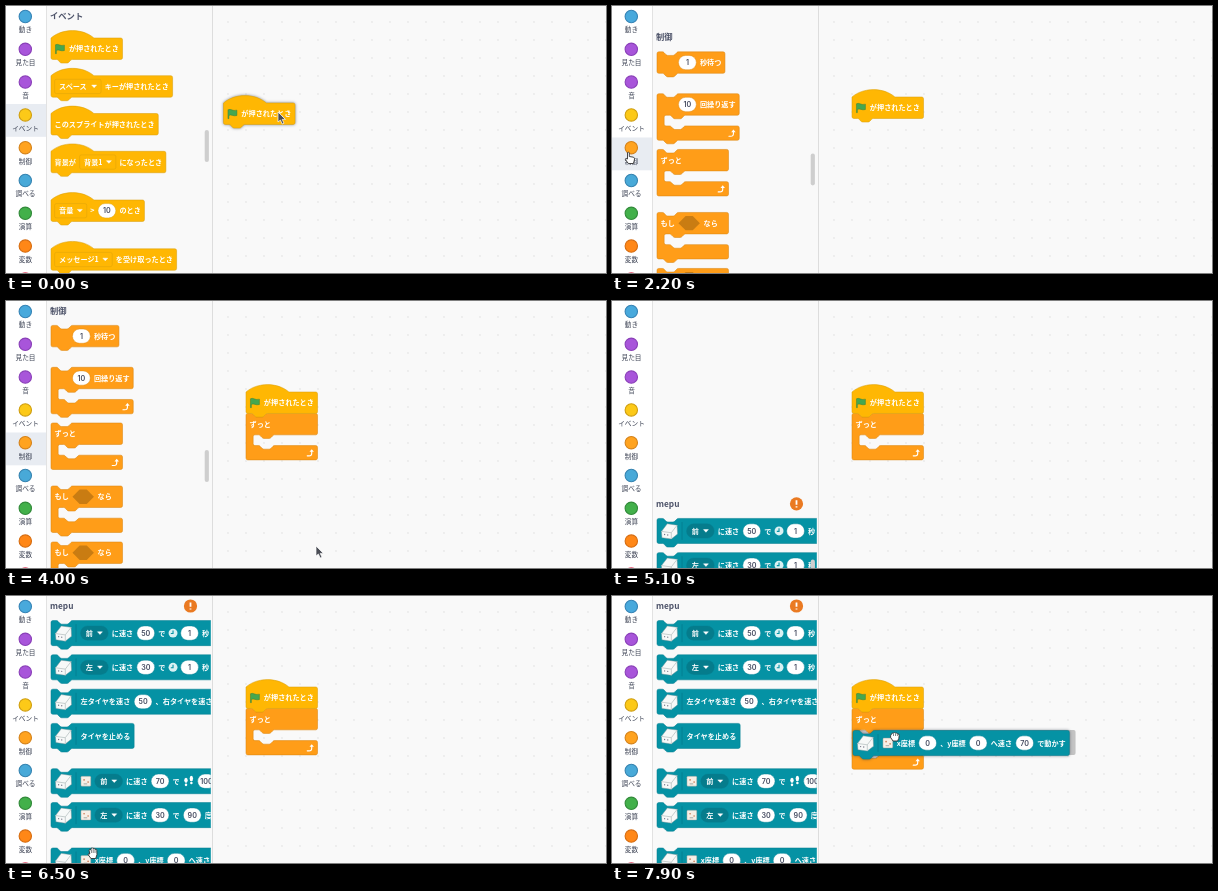
Recreate the animation shown at these times as an HTML page. Size 600 by 267 pixels, loop 8 s.

```html
<!DOCTYPE html>
<html lang="ja">
<head>
<meta charset="utf-8">
<style>
html, body { margin: 0; width: 100%; height: 100%; overflow: hidden; background: #f9f9f9; }
svg { display: block; width: 100%; height: 100%; }
text { font-family: "Noto Sans CJK JP", "Noto Sans CJK", "Noto Sans", sans-serif; }
.b text { font-size: 16px; font-weight: 700; fill: #fff; }
.b .num { font-family: Inter, "Liberation Sans", sans-serif; font-weight: 600; fill: #454b60; text-anchor: middle; }
.head { font-size: 8.3px; font-weight: 700; fill: #4c5268; }
.cat { font-size: 6.7px; font-weight: 500; fill: #3a4052; text-anchor: middle; }
.lift { filter: drop-shadow(0 0 1.6px rgba(20, 30, 50, .5)); }
</style>
</head>
<body>
<svg id="stage" viewBox="0 0 600 267"></svg>
<script>
const LOOP = 8000, STEP = 100, S = 0.447;
const CONTROL_Y = 345, ROBOT_Y = 2050;
const EVENT = { fill: '#ffb703', edge: '#d9a00c', field: '#ffb703' };
const CONTROL = { fill: '#ff9d18', edge: '#d9860f', field: '#c97c12' };
const ROBOT = { fill: '#0592a4', edge: '#057f90', field: '#057c8c' };

const at = (x, y, body, attrs = '') => `<g transform="translate(${x} ${y})" ${attrs}>${body}</g>`;
const rect = (x, y, w, h, fill, attrs = '') =>
  `<rect x="${x}" y="${y}" width="${w}" height="${h}" fill="${fill}" ${attrs}/>`;
const path = (d, attrs) => `<path d="${d}" ${attrs}/>`;
const circle = (x, y, r, attrs) => `<circle cx="${x}" cy="${y}" r="${r}" ${attrs}/>`;
const text = (x, y, s, cls = '') => `<text x="${x}" y="${y}" class="${cls}">${s}</text>`;
const textWidth = s => [...s].reduce((w, c) => w + (c < '\u0080' ? 9 : 16), 0);

// Icons are drawn around their own centre, in block units.
const icons = {
  flag: [24, path('M-9 -9C-4 -12 0 -5 10 -8V4C2 7 -3 0 -8 4V11H-10V-9Z',
    'fill="#45a74f" stroke="#2f7d3c" stroke-linejoin="round"')],
  clock: [18, circle(0, 0, 10, 'fill="#d9f1f3"') +
    path('M0 -6V1H-5', 'fill="none" stroke="#0592a4" stroke-width="2.5"')],
  steps: [24, ['-6 1', '6 -3'].map(p => `<g transform="translate(${p})" fill="#fff">` +
    '<ellipse cy="-3" rx="3.8" ry="6"/><ellipse cy="7" rx="2.8" ry="3"/></g>').join('')],
  mat: [24, rect(-11, -11, 22, 22, '#f7efe6', 'rx="2" stroke="#8f9a97"') +
    circle(-4, -3, 1.8, 'fill="#c9774f"') + circle(5, 2, 1.8, 'fill="#c9774f"') +
    path('M-5 6H3', 'stroke="#9aa3a0" stroke-width="2"')],
  cube: [40, path('M-18 1L-5 -16L17 -13L18 7L4 18L-17 15Z',
    'fill="#f7f9f8" stroke="#6f8f93" stroke-linejoin="round"') +
    path('M-18 1L4 4L17 -13M4 4V18', 'fill="none" stroke="#b9c4c4" stroke-width="1.8"') +
    circle(-11, 8, 1.5, 'fill="#778"') + circle(-4, 9, 1.5, 'fill="#778"')]
};

// Parts: "(" number, "[" square menu, "{" round menu, "<" boolean slot, "@" icon, "|" divider.
function part(p, x, cy, col) {
  const s = p.slice(1);
  switch (p[0]) {
    case '(': return [40, rect(x, cy - 16, 40, 32, '#fff', `rx="16" stroke="${col.edge}"`) +
      text(x + 20, cy + 5.8, s, 'num')];
    case '[': case '{': {
      const round = p[0] === '{', w = textWidth(s) + (round ? 46 : 40);
      const ax = x + w - (round ? 24 : 21);
      return [w, rect(x, cy - 16, w, 32, col.field, `rx="${round ? 16 : 4}" stroke="${col.edge}"`) +
        text(x + (round ? 12 : 10), cy + 6, s) +
        path(`M${ax} ${cy - 3}h11l-5.5 6z`, 'fill="#fff" stroke="#fff" stroke-linejoin="round"')];
    }
    case '<': return [48, path(`M${x} ${cy}l16 -16h16l16 16l-16 16h-16z`, `fill="${col.field}"`)];
    case '@': return [icons[s][0], at(x + icons[s][0] / 2, cy, icons[s][1])];
    case '|': return [2, path(`M${x} ${cy - 20}v40`, `stroke="${col.edge}" stroke-width="2"`)];
    default: return [textWidth(p), text(x, cy + 6, p)];
  }
}

const NOTCH = 'c2 0 3 1 4 2l4 4c1 1 2 2 4 2h12c2 0 3 -1 4 -2l4 -4c1 -1 2 -2 4 -2';
const NOTCH_BACK = 'c-2 0 -3 1 -4 2l-4 4c-1 1 -2 2 -4 2h-12c-2 0 -3 -1 -4 -2l-4 -4c-1 -1 -2 -2 -4 -2';

function outline(shape, w, h, gap, cap) {
  const top = shape === 'hat' ? 'M0 0c25 -22 71 -22 96 0' : `M0 4a4 4 0 0 1 4 -4H12${NOTCH}`;
  const side = v => `H${w - 4}a4 4 0 0 1 4 4v${v - 8}a4 4 0 0 1 -4 4`;
  const mouth = shape === 'c'
    ? `H64${NOTCH_BACK}H20a4 4 0 0 0 -4 4v${gap - 8}a4 4 0 0 0 4 4H28${NOTCH}${side(32)}` : '';
  const foot = cap ? '' : `H48${NOTCH_BACK}`;
  return `${top}${side(h)}${mouth}${foot}H4a4 4 0 0 1 -4 -4z`;
}

function block(col, shape, parts, { gap = 24, loop = false, cap = false, ghost = false } = {}) {
  const h = col === ROBOT ? 56 : 48;
  let x = 8, body = '';
  for (const p of parts) {
    if (shape !== 'hat' && p[0] === '(') x = Math.max(x, 48);
    const [w, svg] = part(p, x, h / 2, col);
    body += svg;
    x += w + 8;
  }
  const w = Math.max(x, shape === 'cmd' ? 64 : 160);
  const shapePath = outline(shape, w, h, gap, cap);
  if (ghost) return `<g transform="scale(${S})">${path(shapePath, 'opacity=".22"')}</g>`;
  if (loop) body += at(w - 16, h + gap + 16,
    path('M-7 7H-3Q3 7 3 1V-3', 'fill="none" stroke="#fff" stroke-width="2.6" stroke-linecap="round"') +
    path('M-2 -2L3 -8L8 -2Z', 'fill="#fff"'));
  return `<g class="b" transform="scale(${S})">` +
    path(shapePath, `fill="${col.fill}" stroke="${col.edge}" stroke-width="1.2"`) + body + '</g>';
}

const stack = (col, shape, rows) =>
  rows.map(([y, parts, opts]) => at(45, y, block(col, shape, parts, opts))).join('');
const robotParts = parts => ['@cube', '|', ...parts];
const HAT = ['@flag', 'が押されたとき'];
const forever = gap => block(CONTROL, 'c', ['ずっと'], { loop: true, cap: true, gap });
const MOVE_TO = robotParts(['@mat', 'x座標', '(0', '、y座標', '(0', 'へ速さ', '(70', 'で動かす']);

const eventList = text(44, 13, 'イベント', 'head') + stack(EVENT, 'hat', [
  [32, HAT],
  [69.7, ['[スペース', 'キーが押されたとき']],
  [107.5, ['このスプライトが押されたとき']],
  [145.3, ['背景が', '[背景1', 'になったとき']],
  [194, ['[音量', '>', '(10', 'のとき']],
  [242.8, ['[メッセージ1', 'を受け取ったとき']]
]);
const controlList = text(44, 13, '制御', 'head') +
  stack(CONTROL, 'cmd', [[24.4, ['(1', '秒待つ']]]) +
  stack(CONTROL, 'c', [
    [66.3, ['(10', '回繰り返す'], { loop: true }],
    [185, ['もし', '<', 'なら']],
    [241, ['もし', '<', 'なら']]
  ]) + at(45, 122, forever());
const robotList = text(44, 13, 'mepu', 'head') +
  circle(184.5, 10, 6.6, 'fill="#ea7a22"') +
  path('M184.5 6.5V10.8M184.5 12.4v1.2', 'stroke="#fff" stroke-width="1.8"') +
  stack(ROBOT, 'cmd', [
    [24.6, ['{前', 'に速さ', '(50', 'で', '@clock', '(1', '秒']],
    [58.8, ['{左', 'に速さ', '(30', 'で', '@clock', '(1', '秒']],
    [93.2, ['左タイヤを速さ', '(50', '、右タイヤを速さ', '(50']],
    [127.4, ['タイヤを止める']],
    [172.7, ['@mat', '{前', 'に速さ', '(70', 'で', '@steps', '(100']],
    [206.6, ['@mat', '{左', 'に速さ', '(30', 'で', '(90', '度']]
  ].map(([y, p]) => [y, robotParts(p)])) + stack(ROBOT, 'cmd', [[252, MOVE_TO]]);

const categories = [
  ['動き', '#48a9dc', '#3583b5'], ['見た目', '#a855da', '#8a40b8'], ['音', '#a855da', '#8a40b8'],
  ['イベント', '#fcc918', '#cf9e10'], ['制御', '#ffa31f', '#d4821a'], ['調べる', '#48a9d8', '#3583b0'],
  ['演算', '#42b04a', '#328a3a'], ['変数', '#ff8717', '#d66c10'], ['', '#ff6680', '#e04a68']
].map(([name, fill, edge], i) => {
  const y = 10.5 + i * 32.8;
  return circle(19.3, y, 6.2, `fill="${fill}" stroke="${edge}" stroke-width="1.1"`) +
    text(19.5, y + 15.8, name, 'cat');
}).join('');

const handStyle = 'fill="#fff" stroke="#333" stroke-width=".9" stroke-linejoin="round"';
const cursors = {
  arrow: path('M0 0V10L2.4 8L4.2 12L6 11.2L4.2 7.4H7.4Z', 'fill="#4a4d55" stroke="#fff" stroke-width=".7"'),
  point: path('M-2.5 -5.5q1.2 -1 1.8 .4V-1.5L3.5 -.8Q5 0 4.4 2L3.4 5.5H-1.6L-4.6 1.6Q-4.6 0 -2.5 1Z', handStyle),
  open: path('M-3.2 1L-4 -3Q-3.2 -4.6 -2.2 -3L-1.8 -4.6Q-.6 -6 0 -4.4Q1.2 -5.8 1.9 -3.6Q3.5 -4.6 3.8 -2.4L4 1.5L2.7 5.5H-2L-4.8 1.8Q-5.2 .2 -3.2 1Z', handStyle) +
    path('M-1.6 -3V0M.2 -4V0M2 -3V0', 'stroke="#333" stroke-width=".6"'),
  closed: path('M-3.6 -1.6Q-3 -3.6 -1.6 -2.8Q-.4 -4 .6 -2.8Q1.8 -3.6 2.5 -2.2Q4.2 -2.4 4.2 -.4L3.8 2.4L2.6 5H-2L-4.4 1.4Q-4.8 -.6 -3.6 -1.6Z', handStyle) +
    path('M-1.5 -2V0M.5 -2V0M2.4 -1.8V0', 'stroke="#333" stroke-width=".6"')
};

const stage = document.getElementById('stage');
stage.innerHTML = `
  <defs>
    <pattern id="dots" x="207" y="0" width="18" height="18" patternUnits="userSpaceOnUse">
      ${circle(15, 16, 0.65, 'fill="#d9d9d9"')}
    </pattern>
    <clipPath id="pane">${rect(41, 0, 163.8, 267, '#000')}</clipPath>
  </defs>
  ${rect(0, 0, 600, 267, '#f9f9f9')}${rect(207, 0, 393, 267, 'url(#dots)')}
  <g id="forever">${forever()}</g>
  <g id="stretched">${forever(56)}</g>
  <g id="hat">${block(EVENT, 'hat', HAT)}</g>
  <g id="ghost">${block(ROBOT, 'cmd', MOVE_TO, { ghost: true })}</g>
  ${rect(0, 0, 40, 267, '#fff')}
  <rect id="mark" width="40" height="32.8" fill="#e8ecf2"/>
  ${categories}
  ${rect(40, 0, 166, 267, '#f9f9f9')}
  <g clip-path="url(#pane)"><g id="list">
    ${eventList}${at(0, CONTROL_Y, controlList)}${at(0, ROBOT_Y, robotList)}
  </g></g>
  <rect id="bar" x="198.7" width="4.2" height="32" rx="2.1" fill="#cecece"/>
  ${rect(40, 0, 0.8, 267, '#dcdcdc')}${rect(206, 0, 0.8, 267, '#d6d6d6')}
  <g id="dragLoop" class="lift">${forever()}</g>
  <g id="dragMove" class="lift">${block(ROBOT, 'cmd', MOVE_TO)}</g>
  ${Object.keys(cursors).map(k => `<g id="${k}">${cursors[k]}</g>`).join('')}`;

const $ = id => document.getElementById(id);
const move = (id, x, y) => $(id).setAttribute('transform', `translate(${x} ${y})`);
const show = (id, on) => { $(id).style.display = on ? '' : 'none'; };

// Pointer stops: time, x, y.
const pointer = [
  [0, 272, 106], [400, 272, 106], [700, 294.5, 100], [1100, 294.5, 100],
  [1600, 18, 152], [2200, 18, 152], [2600, 70, 138], [3000, 70, 138],
  [3400, 275, 133], [3700, 275, 133], [4000, 310, 245], [4400, 310, 245],
  [4600, 60, 290], [6200, 60, 290], [6500, 87, 257], [7400, 87, 257], [7900, 283, 140]
];

function pointerAt(t) {
  const i = pointer.findIndex(k => k[0] > t);
  if (i < 0) return pointer[pointer.length - 1].slice(1);
  const [t0, x0, y0] = pointer[i - 1], [t1, x1, y1] = pointer[i];
  const u = (t - t0) / (t1 - t0), e = u * u * (3 - 2 * u);
  return [x0 + (x1 - x0) * e, y0 + (y1 - y0) * e];
}

function pointerKind(t) {
  if (t < 1500 || (t >= 3800 && t < 4700)) return 'arrow';
  if (t < 2400) return 'point';
  return (t >= 3100 && t < 3500) || t >= 7500 ? 'closed' : 'open';
}

function scrollAt(t) {
  const glide = (from, to, start) => to + (from - to) * Math.exp((start - t) / 46.8);
  if (t < 2100) return 0;
  if (t < 5100) return glide(0, CONTROL_Y, 2070);
  return t < 5400 ? glide(CONTROL_Y, ROBOT_Y, 4998) : ROBOT_Y;
}

function draw(ms) {
  const t = Math.floor(ms / STEP) * STEP;
  const [x, y] = pointerAt(t);
  const scroll = scrollAt(t), docked = t >= 7900;

  move('list', 0, -scroll);
  $('bar').setAttribute('y', 124 + scroll * 25 / CONTROL_Y);
  $('mark').setAttribute('y', t < 2100 ? 98 : 131.5);
  show('mark', t < 5100);

  if (t < 700) move('hat', x - 54.5, y - 9);
  else move('hat', 240, 91);
  $('hat').setAttribute('class', t < 700 ? 'lift' : '');

  move('forever', 240, 112.4);
  move('stretched', 240, 112.4);
  move('ghost', 247.2, 134);
  show('forever', t >= 3500 && !docked);
  show('stretched', docked);
  show('ghost', docked);

  move('dragLoop', x - 25, y - 16);
  show('dragLoop', t >= 3100 && t < 3500);
  move('dragMove', x - 42, y - 5.5);
  show('dragMove', t >= 7500);

  const kind = pointerKind(t);
  for (const k in cursors) show(k, k === kind);
  move(kind, x, y);
}

function tick() {
  draw(performance.now() % LOOP);
  requestAnimationFrame(tick);
}
tick();
</script>
</body>
</html>
```
